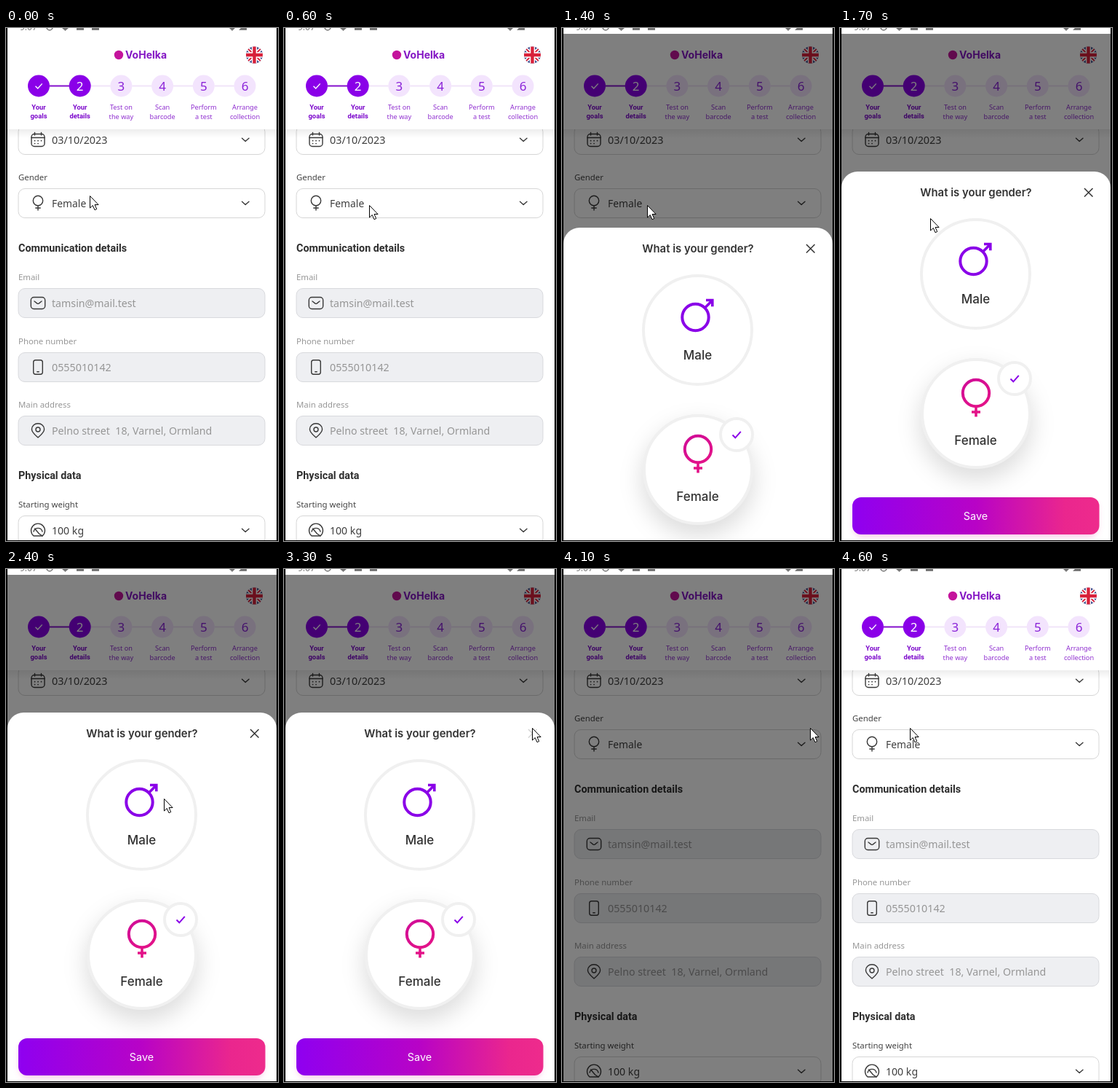
An HTML page that plays this animation: 374x704 px, repeating every 5 s.

```html
<!DOCTYPE html>
<html lang="en">
<head>
<meta charset="utf-8">
<title>Gender picker</title>
<style>
html, body { margin: 0; width: 100%; height: 100%; overflow: hidden; background: #fff; }
svg { display: block; width: 374px; height: 704px; }
text { white-space: pre; }
.noto { font-family: "Noto Sans", "Open Sans", sans-serif; }
.bold { font-family: Roboto, sans-serif; font-weight: 700; }
.inter { font-family: Inter, sans-serif; }
.icon { fill: none; stroke: #383838; stroke-width: 1.4; stroke-linecap: round; stroke-linejoin: round; }
</style>
</head>
<body>
<svg id="stage" viewBox="0 0 374 704">
  <defs>
    <linearGradient id="save">
      <stop offset="0" stop-color="#8f00f0"/>
      <stop offset=".5" stop-color="#b803c6"/>
      <stop offset=".86" stop-color="#ea268e"/>
      <stop offset="1" stop-color="#ee2b8c"/>
    </linearGradient>
    <linearGradient id="pink" gradientUnits="userSpaceOnUse" x1="170" y1="480" x2="204" y2="534">
      <stop offset="0" stop-color="#cf0c98"/>
      <stop offset="1" stop-color="#ea1583"/>
    </linearGradient>
    <linearGradient id="fade" x2="0" y2="1">
      <stop offset="0" stop-color="#000" stop-opacity=".07"/>
      <stop offset="1" stop-color="#000" stop-opacity="0"/>
    </linearGradient>
    <filter id="soft" x="-60%" y="-60%" width="220%" height="220%"><feGaussianBlur stdDeviation="15"/></filter>
    <filter id="glow" x="-10%" y="-50%" width="120%" height="200%"><feGaussianBlur stdDeviation="4"/></filter>
    <clipPath id="disc"><circle cx="341.5" cy="37" r="11.5"/></clipPath>
  </defs>
  <rect width="374" height="704" fill="#fff"/>
  <g id="form"></g>
  <g id="header"></g>
  <rect id="shade" x="2" y="8" width="370" height="696" fill="#000" fill-opacity=".5"/>
  <g id="sheet"></g>
  <path d="M0 0H2V703H372V0H374V704H0Z" fill="#000"/>
  <path id="cursor" d="M0 0V16.5L3.8 13L6.5 19.2L9.2 18L6.6 12H11.6Z" fill="#fff" stroke="#000" stroke-linejoin="round"/>
</svg>
<script>
const $ = id => document.getElementById(id);
const PURPLE = '#8a00e8';

const text = (x, y, str, size, cls, fill, extra = '') =>
  `<text x="${x}" y="${y}" font-size="${size}" class="${cls}" fill="${fill}" ${extra}>${str}</text>`;
const mid = 'text-anchor="middle"';
const circle = (x, y, r, attrs) => `<circle cx="${x}" cy="${y}" r="${r}" ${attrs}/>`;
const path = (d, attrs = '') => `<path d="${d}" ${attrs}/>`;
const rect = (x, y, w, h, r, attrs = '') =>
  `<rect x="${x}" y="${y}" width="${w}" height="${h}" rx="${r}" ${attrs}/>`;

// Icons are centred on 0,0
const icons = {
  date: rect(-9, -8, 18, 17, 4) + path('M-9 -3H9M-4.5 -10V-6.5M4.5 -10V-6.5') +
    path('M-4.5 1.2h.1M0 1.2h.1M4.5 1.2h.1M-4.5 5h.1M0 5h.1', 'stroke-width="1.7"'),
  gender: circle(0, -3.5, 6.7, '') + path('M0 3.2V9.5M-3.2 6.5H3.2'),
  mail: rect(-9.7, -8, 19.4, 16, 4) + path('M-5 -2.5L-1 .6Q0 1.2 1 .6L5 -2.5'),
  phone: rect(-6.3, -9.7, 12.6, 19.4, 3) + path('M-1.2 6.2H1.2'),
  pin: path('M0 9.5C-4 6 -8.6 2.5 -8.6 -2A8.6 7.8 0 0 1 8.6 -2C8.6 2.5 4 6 0 9.5Z') + circle(0, -1.5, 3, ''),
  scale: path('M-6 7.5A9.5 9.5 0 1 1 6 7.5Z') + path('M-6 1.5A6.2 6.2 0 0 1 6 1.5M-4.5 -2.5L1.5 4.5L6 7.500')
};

function field(y, icon, value, size, locked) {
  const c = y + 20.5;
  return rect(17, y + .5, 339, 40, 9, `fill="${locked ? '#eeeff2' : '#fff'}" stroke="${locked ? '#d8d9dd' : '#d6d6d6'}"`) +
    `<g class="icon" transform="translate(44 ${c})">${icons[icon]}</g>` +
    text(63, c + 5.2, value, size, 'noto', locked ? '#969696' : '#404040') +
    (locked ? '' : path(`M324.5 ${c - 2.2}L329.2 ${c + 2}L334 ${c - 2.2}`, 'class="icon"'));
}
const label = (y, str, fill) => text(17, y, str, 11.4, 'noto', fill);
const heading = (y, str) => text(17, y, str, 14.35, 'bold', '#2e2e2e');

$('form').innerHTML =
  field(133, 'date', '03/10/2023', 14.4) +
  label(209, 'Gender', '#444') + field(220, 'gender', 'Female', 13.9) +
  heading(307, 'Communication details') +
  label(346, 'Email', '#979797') + field(357, 'mail', 'tamsin@mail.test', 14.2, true) +
  label(433.5, 'Phone number', '#979797') + field(445, 'phone', '0555010142', 14.3, true) +
  label(521, 'Main address', '#979797') + field(532, 'pin', 'Pelno street  18, Varnel, Ormland', 14.2, true) +
  heading(619, 'Physical data') +
  label(658.3, 'Starting weight', '#444') + field(669, 'scale', '100 kg', 14.1);

const steps = ['Your goals', 'Your details', 'Test on|the way', 'Scan barcode', 'Perform|a test', 'Arrange collection'];

function step(name, i) {
  const x = 45 + 56.7 * i, on = i < 2;
  const words = name.split(name.includes('|') ? '|' : ' ');
  const link = i < 5 ? path(`M${x + 15} 79.5H${x + 42}`, `stroke="${i ? '#f0e4f8' : '#8410cc'}" stroke-width="2"`) : '';
  const mark = i
    ? text(x, 85.5, i + 1, 17, 'noto', on ? '#fff' : '#8a22d8', mid)
    : path('M40.5 79.8L43.7 82.9L49.7 76.4', 'fill="none" stroke="#fff" stroke-width="1.4"');
  return link + circle(x, 79.5, 15, `fill="${on ? PURPLE : '#f3e4fd'}"`) + mark +
    words.map((w, n) => text(x, 112.3 + (on ? 11.4 : 12.2) * n, w, on ? 9.4 : 9.2, on ? 'bold' : 'noto', on ? '#7c08cc' : '#9030d0', mid)).join('');
}

const flag = '<g clip-path="url(#disc)">' + rect(329, 25, 25, 24, 0, 'fill="#24347c"') +
  path('M329 25L354 49M354 25L329 49', 'stroke="#fff" stroke-width="5"') +
  path('M329 25L354 49M354 25L329 49', 'stroke="#d8203a" stroke-width="2"') +
  path('M341.5 25V49M329 37H354', 'stroke="#fff" stroke-width="7.4"') +
  path('M341.5 25V49M329 37H354', 'stroke="#d8203a" stroke-width="4.4"') + '</g>';

const status = text(19, 3, '9:07', 12, 'noto', '#777') +
  circle(60, -1, 4, 'fill="none" stroke="#777" stroke-width="1.5"') +
  path('M77 0H86L81.5 4ZM97 0H107V3H97ZM118 0H128V3H118ZM307 0H315L311 4ZM320 3L331 -8V3Z', 'fill="#777"');

$('header').innerHTML =
  rect(2, 139, 370, 12, 0, 'fill="url(#fade)"') + rect(2, 0, 370, 139, 0, 'fill="#fff"') + status +
  circle(155, 37, 6.2, 'fill="#c4149c"') +
  text(164, 41.8, 'VoHelka', 14, 'inter', '#8416c4', 'font-weight="700"') +
  flag + steps.map(step).join('');

const ring = 'fill="#fff" stroke="#f0f0f0" stroke-width="4"';
const line = (color, w) => `fill="none" stroke="${color}" stroke-width="${w}"`;

$('sheet').innerHTML =
  path('M2 760V219A22 22 0 0 1 24 197H350A22 22 0 0 1 372 219V760Z', 'fill="#fff"') +
  text(187, 230.6, 'What is your gender?', 14.9, 'inter', '#333', mid + ' font-weight="600"') +
  path('M336 220L347.5 231.5M347.5 220L336 231.5', 'id="close" ' + line('#333', 1.5)) +
  circle(186.5, 337.5, 74.5, ring) +
  circle(183.5, 320, 18.2, line(PURPLE, 4)) +
  path('M196.5 307L206 297.5M198 296.5H206.8V305.3', line(PURPLE, 3.6)) +
  text(186.5, 378.2, 'Male', 17, 'inter', '#333', mid + ' font-weight="500"') +
  circle(187, 543, 78, 'fill="#000" fill-opacity=".13" filter="url(#soft)"') +
  circle(187, 529, 74, ring) +
  circle(187, 501, 18.2, line('url(#pink)', 4)) +
  path('M185.2 519H188.8V525.3H193V528.8H188.8V533.5H185.2V528.8H181V525.3H185.2Z', 'fill="#e31288"') +
  text(186.5, 572, 'Female', 17, 'inter', '#333', mid + ' font-weight="500"') +
  circle(240, 481, 22, ring) +
  path('M234.5 481.5L238.3 485.3L245.8 476.8', line(PURPLE, 2)) +
  rect(19, 650, 335, 48, 12, 'fill="#e85ab8" fill-opacity=".35" filter="url(#glow)"') +
  rect(17, 644, 339.5, 51, 12, 'fill="url(#save)"') +
  text(186.5, 674.8, 'Save', 14.4, 'inter', '#fff', mid);

// Pointer stops: time, x, y
const route = [
  [0, 115, 230], [600, 117, 243], [1600, 117, 243], [2100, 151, 335], [2400, 217, 315],
  [2700, 286, 273], [3100, 337, 214], [3200, 337, 214], [3300, 341, 218], [4100, 341, 218],
  [4600, 96, 218], [5000, 96, 218]
];

function pointer(t) {
  const i = route.findIndex(stop => stop[0] > t);
  const [t0, x0, y0] = route[i - 1], [t1, x1, y1] = route[i];
  const k = (t - t0) / (t1 - t0);
  return [x0 + (x1 - x0) * k, y0 + (y1 - y0) * k];
}

const clamp = v => Math.min(1, Math.max(0, v));
const TRAVEL = 509;

function sheetDrop(t) {
  if (t < 3500) return TRAVEL * (1 - clamp((t - 1000) / 655)) ** 2;
  return TRAVEL * (1 - Math.cos(Math.PI * clamp((t - 3500) / 613))) / 2;
}

function draw(now) {
  const t = Math.floor(now % 5000 / 100) * 100;   // the picture moves at 10 steps a second
  const open = t >= 1000 && t < 4200;
  $('shade').style.display = $('sheet').style.display = open ? '' : 'none';
  $('sheet').setAttribute('transform', `translate(0 ${Math.round(sheetDrop(t))})`);
  $('close').setAttribute('stroke', t >= 3300 && t < 3600 ? '#d4d4d4' : '#333');
  const [x, y] = pointer(t);
  $('cursor').setAttribute('transform', `translate(${Math.round(x) + .5} ${Math.round(y) + .5})`);
}

const start = performance.now();
function tick() {
  draw(performance.now() - start);
  requestAnimationFrame(tick);
}
tick();
</script>
</body>
</html>
```
